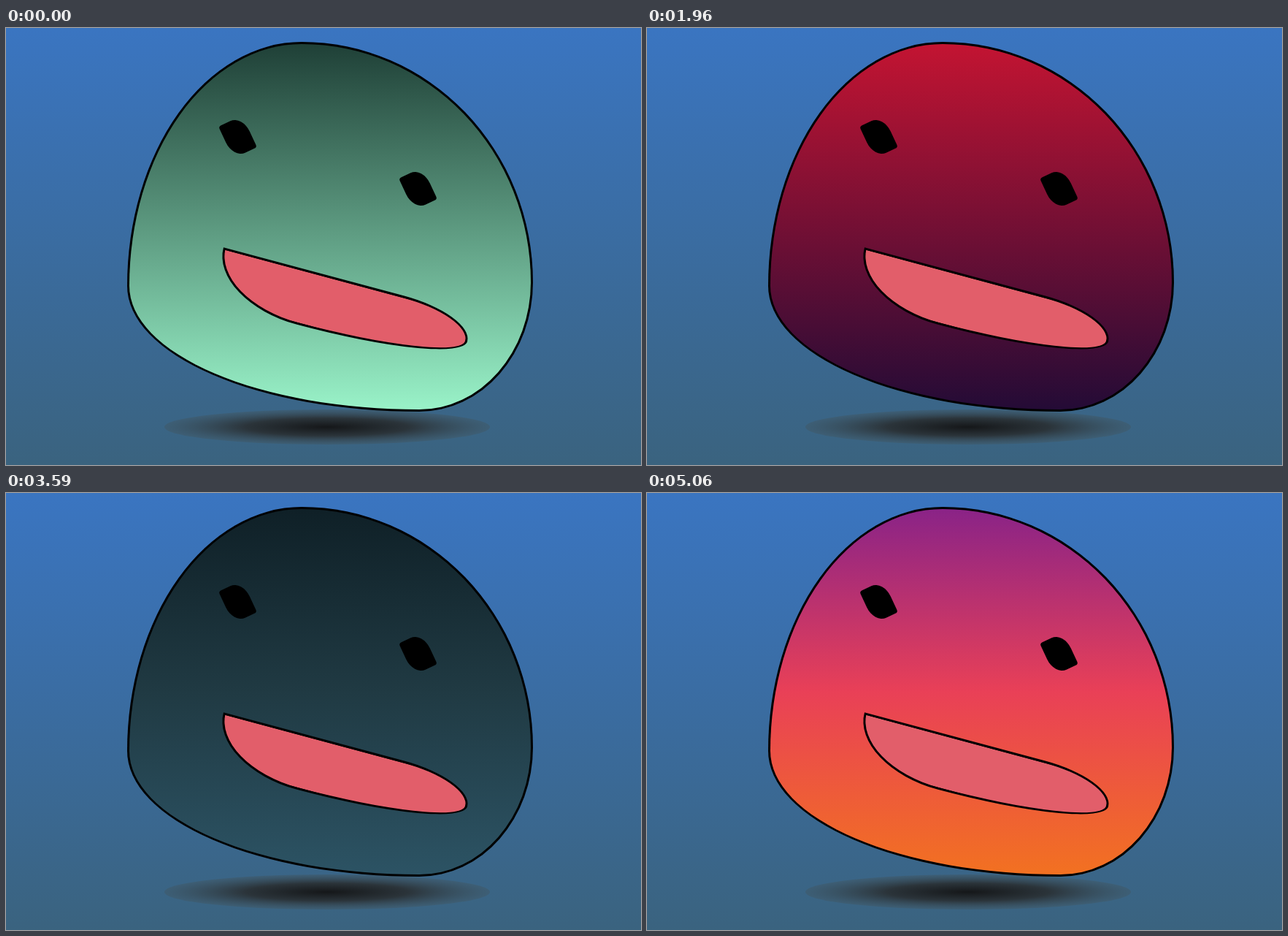
Write an HTML page with a canvas that moves like this. It is 870 px wide and 598 px high and loops after 5.21 s.

```html
<!DOCTYPE html>
<html lang="en">
<head>
<meta charset="utf-8">
<title>Blob</title>
<style>
  html, body { margin: 0; width: 100%; height: 100%; overflow: hidden; background: #3a6ca0; }
  canvas { display: block; }
</style>
</head>
<body>
<canvas id="stage" width="870" height="598"></canvas>
<script>
const ctx = document.getElementById('stage').getContext('2d');
const LOOP = 5210;
const BORDER = 3;

const SKINS = [
  ['#1f4037', '#99f2c8'],
  ['#c31432', '#240b36'],
  ['#0f2027', '#203a43', '#2c5364'],
  ['#8a2387', '#e94057', '#f27121'],
  ['#fc466b', '#3f5efb'],
  ['#f12711', '#f5af19']
];

// Tempo: the beat rises evenly between these moments, quickly at first.
const TEMPO = [
  { at: 0, beat: 0 },
  { at: 230, beat: 1 },
  { at: 385, beat: 2 },
  { at: 620, beat: 5 },
  { at: 1110, beat: 9 },
  { at: 1950, beat: 13 },
  { at: 2250, beat: 14 },
  { at: 5040, beat: 27 },
  { at: LOOP, beat: 27.7 }
];

function beatAt(time) {
  const next = TEMPO.findIndex(key => key.at > time);
  const a = TEMPO[next - 1];
  const b = TEMPO[next];
  return Math.floor(a.beat + (b.beat - a.beat) * (time - a.at) / (b.at - a.at));
}

function verticalGradient(y0, y1, colors) {
  const gradient = ctx.createLinearGradient(0, y0, 0, y1);
  colors.forEach((color, i) => gradient.addColorStop(i / (colors.length - 1), color));
  return gradient;
}

// Corner shares run clockwise from the top left, like CSS border-radius.
function blobPath(x, y, w, h, across, down, inset = 0) {
  ctx.beginPath();
  for (let i = 0; i < 4; i++) {
    const right = i === 1 || i === 2;
    const bottom = i > 1;
    const rx = Math.max(across[i] * w, inset);
    const ry = Math.max(down[i] * h, inset);
    const from = Math.PI * (1 + i / 2);
    ctx.ellipse(right ? x + w - rx : x + rx, bottom ? y + h - ry : y + ry,
      rx - inset, ry - inset, 0, from, from + Math.PI / 2);
  }
  ctx.closePath();
}

function borderedBlob(x, y, w, h, across, down, fill) {
  ctx.save();
  blobPath(x, y, w, h, across, down);
  ctx.fillStyle = '#000';
  ctx.fill();
  ctx.beginPath();
  ctx.rect(x + BORDER, y + BORDER, w - 2 * BORDER, h - 2 * BORDER);
  ctx.clip();
  blobPath(x, y, w, h, across, down, BORDER);
  ctx.fillStyle = fill;
  ctx.fill();
  ctx.restore();
}

function placed(x, y, degrees, paint) {
  ctx.save();
  ctx.translate(x, y);
  ctx.rotate(degrees * Math.PI / 180);
  paint();
  ctx.restore();
}

function drawBackground() {
  ctx.fillStyle = verticalGradient(0, 598, ['#3a75c1', '#3a637f']);
  ctx.fillRect(0, 0, 870, 598);
}

function drawShadow() {
  placed(440, 546, 0, () => {
    ctx.scale(223, 24);
    const gradient = ctx.createRadialGradient(0, 0, 0, 0, 0, 1);
    gradient.addColorStop(0, 'rgb(21, 23, 25)');
    gradient.addColorStop(0.5, 'rgb(43, 52, 58)');
    gradient.addColorStop(1, 'rgba(64, 88, 102, 0.5)');
    ctx.beginPath();
    ctx.arc(0, 0, 1, 0, 2 * Math.PI);
    ctx.fillStyle = gradient;
    ctx.fill();
  });
}

function drawEye(x, y) {
  placed(x, y, -25, () => {
    blobPath(-18, -24, 36, 48, [0.11, 0.5, 0.11, 0.5], [0.08, 0.5, 0.08, 0.5]);
    ctx.fillStyle = '#000';
    ctx.fill();
  });
}

function drawMouth() {
  placed(298, 300.2, 15, () =>
    borderedBlob(0, 0, 356, 76, [0, 0.28, 0.65, 0.35], [0, 0.5, 0.5, 1], '#e25e6a'));
}

function draw(time) {
  const skin = SKINS[beatAt(time) % SKINS.length];
  drawBackground();
  drawShadow();
  borderedBlob(166, 19, 556, 506, [0.43, 0.57, 0.28, 0.72], [0.66, 0.65, 0.35, 0.34],
    verticalGradient(22, 522, skin));
  drawEye(317.5, 149);
  drawEye(564.5, 220);
  drawMouth();
}

const start = performance.now();
function tick() {
  draw((performance.now() - start) % LOOP);
  requestAnimationFrame(tick);
}
tick();
</script>
</body>
</html>
```
